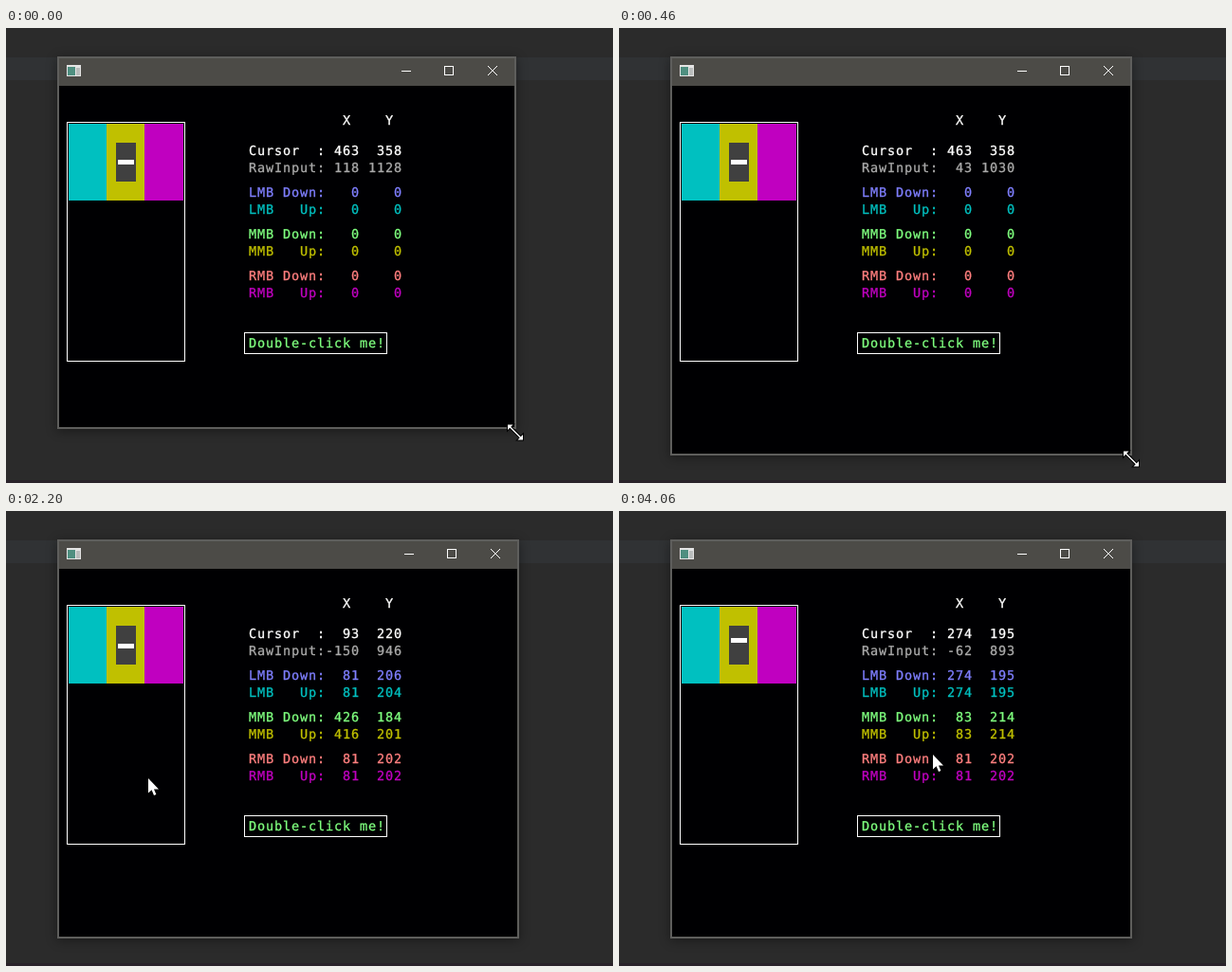
Recreate the animation shown at these times as an HTML page. Size 640 by 480 pixels, loop 4.13 s.

```html
<!DOCTYPE html>
<html lang="en">
<head>
<meta charset="utf-8">
<title>Mouse input test</title>
<style>
html, body { margin: 0; width: 100%; height: 100%; overflow: hidden; background: #2b2b2b; }
svg { display: block; }
text {
  font: 13.5px "DejaVu Sans Mono", "Noto Sans Mono", monospace;
  letter-spacing: .873px;
  white-space: pre;
  text-rendering: geometricPrecision;
  stroke: currentColor;
  stroke-width: .3px;
  fill: currentColor;
}
.crisp { shape-rendering: crispEdges; }
.line { fill: none; stroke: #fff; }
#frame { fill: #5e5e5c; filter: drop-shadow(0 2px 6px rgba(0, 0, 0, .4)); }
.pointer { fill: #fff; stroke: #000; stroke-width: 2; paint-order: stroke; }
</style>
</head>
<body>
<svg width="640" height="480" viewBox="0 0 640 480">
  <defs>
    <path id="sizer" class="pointer" d="M-8-8h5.5l-2.25 2.25 10.5 10.5L8 2.5V8H2.5l2.25-2.25-10.5-10.5L-8-2.5z"/>
  </defs>
  <g class="crisp">
    <rect width="640" height="480" fill="#2b2b2b"/>
    <rect y="31" width="640" height="24" fill="#303234"/>
    <rect y="477" width="640" height="3" fill="#29222a"/>
  </g>

  <rect id="frame" x="54" y="30"/>
  <rect id="bar" class="crisp" x="56" y="32" height="29" fill="#4c4b47"/>
  <g class="crisp">
    <rect x="64" y="39" width="15" height="12" fill="#e4e4e4"/>
    <rect x="65" y="41" width="8" height="9" fill="#4f8f80"/>
    <rect x="74" y="42" width="4" height="8" fill="#b9bcbc"/>
  </g>
  <g id="buttons" class="line">
    <path class="crisp" d="M-121 45.5h10M-75.5 40.5h9v9h-9z"/>
    <path d="M-30 40l10 10m0-10l-10 10"/>
  </g>

  <svg id="client" x="56" y="61">
    <g transform="translate(-56 -61)">
      <rect x="56" y="61" width="600" height="480" fill="#000002"/>
      <g class="crisp">
        <rect class="line" x="64.5" y="99.5" width="124" height="252"/>
        <rect class="key" x="66" y="101" width="40" height="81"/>
        <rect class="key" x="106" y="101" width="40" height="81"/>
        <rect class="key" x="146" y="101" width="41" height="81"/>
        <rect x="116" y="121" width="21" height="41" fill="#404040"/>
        <rect id="notch" x="118" width="17" height="5" fill="#fff"/>
        <rect class="line" x="251.5" y="321.5" width="150" height="22"/>
      </g>
      <text x="256" y="337" color="#7fff7f">Double-click me!</text>
      <text x="355" y="102" color="#fff">X    Y</text>
      <g id="rows"></g>
    </g>
  </svg>

  <use id="size" href="#sizer"/>
  <use id="lead" href="#sizer"/>
  <path id="arrow" class="pointer" d="M0 0V15.5L3.6 12.2 6 18 8.4 17 6 11.4H11z"/>
</svg>
<script>
const LOOP = 4130, NS = 'http://www.w3.org/2000/svg';
const $ = id => document.getElementById(id);

const rows = [
  ['Cursor  :', '#ffffff'], ['RawInput:', '#aaaaaa'],
  ['LMB Down:', '#7f7fff'], ['LMB   Up:', '#00c0c0'],
  ['MMB Down:', '#7fff7f'], ['MMB   Up:', '#c0c000'],
  ['RMB Down:', '#ff7f7f'], ['RMB   Up:', '#c000c0']
].map(([label, color], i) => {
  const el = document.createElementNS(NS, 'text');
  set(el, { x: 256, y: 134 + 18 * i + 8 * (i >> 1), color });
  $('rows').append(el);
  return { label, color, el };
});
const keys = document.querySelectorAll('.key');

// Key points: [tick, value...], eased in between, 15 ticks per second
const corner = [[0, 538, 423], [3, 404, 355], [7, 541, 451]];
const wheel = [[31, 139], [33, 140], [40, 134]];
const raw = [[0, 118, 1128], [4, 21, 1056], [15, 139, 915], [22, 136, 914],
  [33, -150, 946], [49, -25, 939], [61, -62, 893]];
const pointer = [[7, 463, 358], [10, 417, 343], [12, 406, 263], [13, 427, 214],
  [14, 416, 215], [15, 426, 184], [16, 426, 184], [18, 416, 201], [22, 424, 194],
  [24, 424, 194], [28, 81, 206], [30, 81, 202], [31, 81, 202], [33, 93, 220],
  [41, 83, 214], [42, 83, 214], [46, 262, 337], [49, 296, 279], [51, 296, 279],
  [53, 290, 305], [57, 20, 208], [61, 274, 195]];

// Presses: [button, down tick, up tick]
const presses = [[0, 10, 12], [2, 13, 14], [1, 16, 18], [0, 28, 29], [2, 30, 31],
  [1, 41, 42], [0, 51, 52], [0, 61, 61]];

function at(track, k) {
  const i = track.findIndex(p => p[0] >= k);
  if (i < 1) return track.at(i).slice(1);
  const a = track[i - 1], b = track[i], u = (k - a[0]) / (b[0] - a[0]);
  const ease = u * u * (3 - 2 * u);
  return a.slice(1).map((v, n) => Math.round(v + (b[n + 1] - v) * ease));
}

function set(el, attrs) {
  for (const name in attrs) el.setAttribute(name, attrs[name]);
}

function place(el, x, y, visible = true) {
  set(el, { transform: `translate(${x} ${y})`, visibility: visible ? 'visible' : 'hidden' });
}

function draw(k) {
  const [right, bottom] = at(corner, k);
  set($('frame'), { width: right - 54, height: bottom - 30 });
  set($('bar'), { width: right - 58 });
  set($('client'), { width: right - 58, height: bottom - 63 });
  place($('buttons'), right, 0);

  const pos = at(pointer, k);
  const values = [pos, at(raw, k), ...Array(6).fill([0, 0])];
  const held = [false, false, false];
  for (const [button, down, up] of presses) {
    const row = 2 + 2 * button;
    if (k >= down) values[row] = at(pointer, down);
    if (k >= up) values[row + 1] = at(pointer, up);
    held[button] ||= k >= down && k < up;
  }
  // A narrow window cuts off the rows that are not being repainted
  const narrow = right < 430;
  rows.forEach((row, i) => {
    const [x, y] = values[i];
    row.el.textContent = row.label + String(x).padStart(4) +
      (narrow && i > 1 ? '' : String(y).padStart(5));
  });
  keys.forEach((key, i) => set(key, { fill: rows[2 + 2 * i + (held[i] ? 0 : 1)].color }));
  set($('notch'), { y: at(wheel, k)[0] });

  const sizing = k < 8;
  place($('size'), right - 1, bottom + 3.5, sizing);
  place($('lead'), right + 16.5, bottom + 26.5, k > 3 && k < 7);
  place($('arrow'), pos[0] + 57, pos[1] + 62, !sizing);
}

const start = performance.now();
let last = -1;
function loop() {
  const t = (performance.now() - start) % LOOP;
  const k = Math.ceil(3 * (Math.floor(t / 10) + 1) / 20) - 1;
  if (k !== last) draw(last = k);
  requestAnimationFrame(loop);
}
loop();
</script>
</body>
</html>
```
